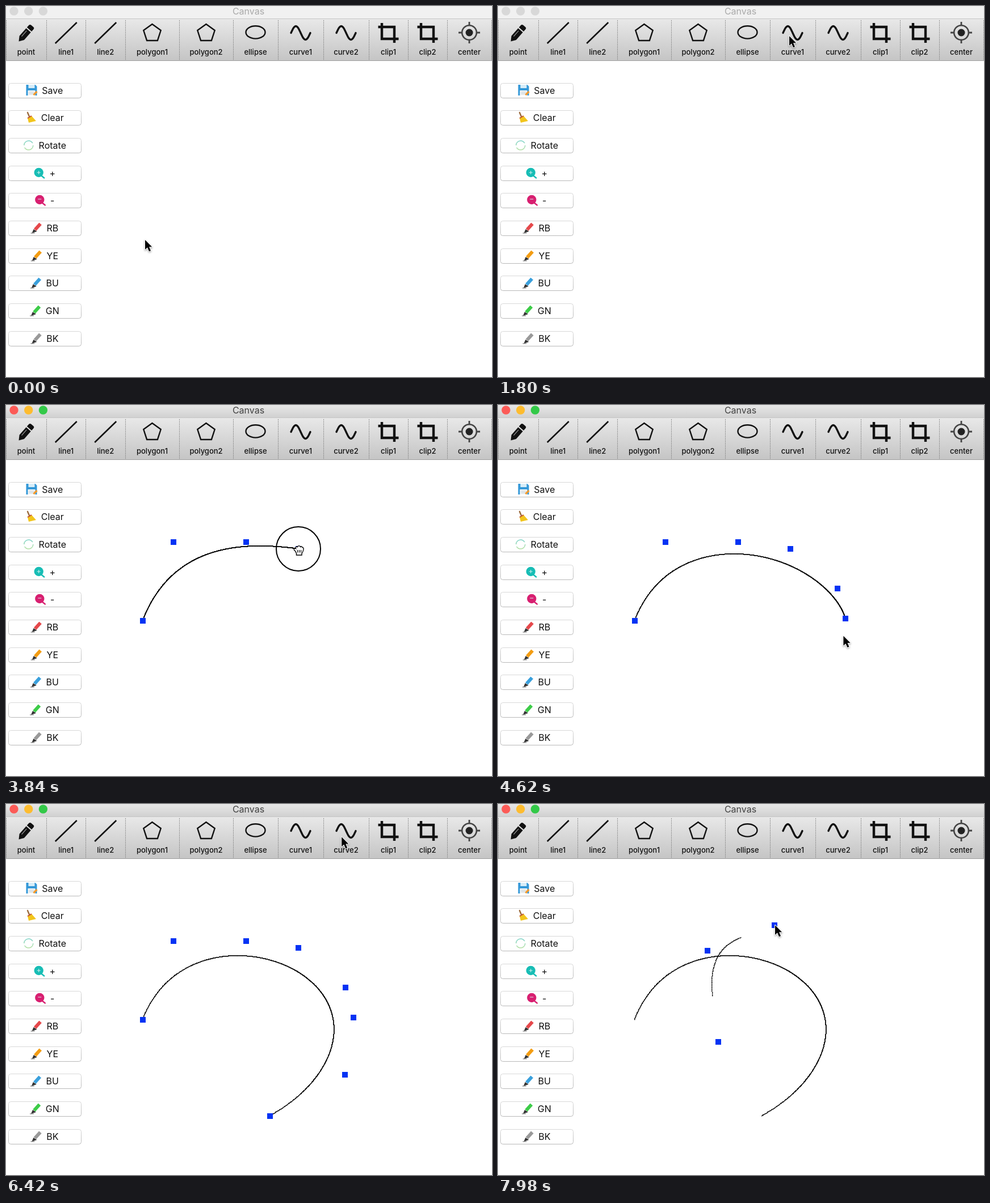
Animation of 856 by 655 pixels, one loop 8000 ms. Source, as an HTML page with a canvas:

```html
<!DOCTYPE html>
<html lang="en">
<head>
<meta charset="utf-8">
<title>Canvas</title>
<style>
html, body { margin: 0; width: 100%; height: 100%; overflow: hidden; background: #fff; }
canvas { display: block; }
</style>
</head>
<body>
<canvas id="stage" width="856" height="655"></canvas>
<script>
const ctx = document.getElementById('stage').getContext('2d');
const W = 856, H = 655, LOOP = 8000, STEP = 60, HOLD = 120;
const FONT = 'Inter, "Open Sans", sans-serif';

const stop = (x, y, press, rest = 0) => ({ x, y, press, rest, release: press + HOLD });
const hover = stop(302, 300, 480, 160);
const bezierTool = stop(512, 53, 1920);
const bezierStops = [
  stop(241, 381, 2580), stop(295, 242, 3120, 120), stop(423, 242, 3480),
  stop(515, 254, 3780), stop(598, 324, 4080), stop(612, 377, 4440),
  stop(597, 478, 4860), stop(465, 551, 5340, 180)
];
const splineTool = stop(591, 55, 6540, 180);
const splineStops = [stop(388, 420, 6960), stop(369, 259, 7380), stop(487, 214, 7860)];
const toolStops = [bezierTool, splineTool];
const canvasStops = [...bezierStops, ...splineStops];
const route = [hover, bezierTool, ...bezierStops, splineTool, ...splineStops];

function bar(x, y, w, h, color) {
  ctx.fillStyle = color;
  ctx.fillRect(x, y, w, h);
}

function fillPath(d, color) {
  ctx.fillStyle = color;
  ctx.fill(new Path2D(d));
}

function strokePath(d, color, width, cap = 'butt') {
  ctx.strokeStyle = color;
  ctx.lineWidth = width;
  ctx.lineCap = cap;
  ctx.stroke(new Path2D(d));
}

function disc(x, y, r, color) {
  ctx.fillStyle = color;
  ctx.beginPath();
  ctx.arc(x, y, r, 0, 7);
  ctx.fill();
}

function ring(x, y, rx, ry, color, width) {
  ctx.strokeStyle = color;
  ctx.lineWidth = width;
  ctx.beginPath();
  ctx.ellipse(x, y, rx, ry, 0, 0, 7);
  ctx.stroke();
}

// Joins f(0) … f(1) into path data
function trace(f, n) {
  const points = Array.from({ length: n + 1 }, (_, i) => f(i / n).join(' '));
  return 'M' + points.join('L');
}

function text(s, x, y, size, color, weight = 400) {
  ctx.font = `${weight} ${size}px ${FONT}`;
  ctx.textAlign = 'center';
  ctx.fillStyle = color;
  ctx.fillText(s, x, y);
}

function at(x, y, draw) {
  ctx.save();
  ctx.translate(x, y);
  draw();
  ctx.restore();
}

function vertical(y0, y1, top, bottom) {
  const g = ctx.createLinearGradient(0, y0, 0, y1);
  g.addColorStop(0, top);
  g.addColorStop(1, bottom);
  return g;
}

// Toolbar icons, drawn around their centre
function pencil() {
  ctx.translate(-13, 15.5);
  ctx.rotate(-0.85);
  fillPath('M0 0L8 -5.5H26V5.5H8Z', '#111');
  ctx.beginPath();
  ctx.roundRect(28, -5.5, 8, 11, [0, 3, 3, 0]);
  ctx.fill();
  strokePath('M10 -2H23', '#aaa', 1);
}

function line() {
  strokePath('M-19 19L19 -18', '#111', 2.6);
}

function polygon() {
  const corner = u => [16 * Math.sin(u * Math.PI * 2), 1 - 16 * Math.cos(u * Math.PI * 2)];
  strokePath(trace(corner, 5) + 'Z', '#111', 2.4);
}

function ellipse() {
  ring(0, -0.6, 17, 11.2, '#111', 2.4);
}

function curve() {
  const wave = u => [34 * u - 17, 0.5 - 12 * Math.sin(u * Math.PI * 2)];
  strokePath(trace(wave, 24), '#111', 3.4, 'round');
}

function crop() {
  strokePath('M-11.5 -17V11H18M-18 -10H10.5V18', '#111', 4.4);
}

function target() {
  ring(0, 0, 12.8, 12.8, '#444', 2.6);
  disc(0, 0, 6.5, '#222');
  strokePath('M-19 0H-12M12 0H19M0 -19V-12M0 12V19', '#444', 2.8);
}

// Label, icon, cell width
const tools = [
  ['point', pencil, 71], ['line1', line, 69.5], ['line2', line, 69.5],
  ['polygon1', polygon, 95], ['polygon2', polygon, 95], ['ellipse', ellipse, 79],
  ['curve1', curve, 80], ['curve2', curve, 80], ['clip1', crop, 69],
  ['clip2', crop, 69], ['center', target, 78]
];

// Side button icons
function floppy() {
  fillPath('M-10 -10H6L9 -7V9H-10Z', '#3498d8');
  bar(-6, -10, 11, 6, '#d8edf8');
  bar(-7, 0, 13, 9, '#f4f7f8');
  strokePath('M-5 3H4M-5 6H3', '#b6c3ca', 1);
  strokePath('M3 8L9 2', '#f29a2e', 3.2);
}

function broom() {
  strokePath('M-6 -9L-3 -2', '#9b6b3f', 2.4, 'round');
  fillPath('M-6 1L1 -3L9 6L-4 9Z', '#f2c51d');
  strokePath('M-6 1L1 -3', '#c0542d', 2);
}

function rotation() {
  ctx.setLineDash([21, 4]);
  ring(0, 0, 8, 8, vertical(-8, 8, '#7fd3c8', '#b4e0a4'), 1.5);
  ctx.setLineDash([]);
}

const lens = (color, sign) => () => {
  strokePath('M4 5L8.5 8.5', color, 2.4, 'round');
  disc(-1, -1, 8.2, color);
  strokePath(sign, '#d6f0ee', 1);
};

const pen = color => () => {
  strokePath('M-2.5 3L7 -7.5', color, 6);
  fillPath('M-8 9L-5 2L1 6Z', '#333');
  strokePath('M-10 9H-3', '#666', 1);
};

const buttons = [
  ['Save', floppy], ['Clear', broom], ['Rotate', rotation],
  ['+', lens('#17bdb5', 'M-4 -1H2M-1 -4V2')], ['-', lens('#d81f70', 'M-4 -2H2')],
  ['RB', pen('#e5484b')], ['YE', pen('#f39c12')], ['BU', pen('#3aa0dc')],
  ['GN', pen('#3dcc48')], ['BK', pen('#999')]
];

function drawTitle(active) {
  bar(0, 0, W, 22, active ? vertical(0, 22, '#e7e7e7', '#d1d1d1') : '#f1f1f1');
  ['#fc5b57', '#fdbc2f', '#33c948'].forEach((color, i) => {
    disc(14 + i * 25.7, 9, 7.7, active ? color : '#d8d8d8');
  });
  text('Canvas', 427, 15.3, 16, active ? '#404040' : '#a9a9a9');
}

function drawToolbar() {
  bar(0, 22, W, 75, vertical(22, 97, '#e9e9e9', '#c4c4c4'));
  bar(0, 22, W, 1, '#c6c6c6');
  bar(0, 96, W, 1, '#9f9f9f');
  let x = 0;
  for (const [label, icon, width] of tools) {
    at(x + width / 2, 47, icon);
    text(label, x + width / 2, 86, 13, '#111', 500);
    drawDivider(x);
    x += width;
  }
  drawDivider(x);
}

function drawDivider(x) {
  ctx.setLineDash([1.5, 1.5]);
  strokePath(`M${Math.floor(x) + 0.5} 25V95`, '#777', 1);
  ctx.setLineDash([]);
}

function drawButtons() {
  buttons.forEach(([label, icon], i) => {
    const top = Math.round(136.6 + i * 48.68);
    ctx.beginPath();
    ctx.roundRect(4.5, top - 0.5, 128, 26, 4);
    ctx.strokeStyle = vertical(top, top + 26, '#d8d8d8', '#b8b8b8');
    ctx.lineWidth = 1;
    ctx.stroke();
    text(label, 81.8, top + 18, 16, '#111');
    at(64 - ctx.measureText(label).width / 2, top + 12, icon);
  });
}

function bezier(points, u) {
  let p = points;
  while (p.length > 1) p = p.slice(1).map((q, i) => mix(p[i], q, u));
  return p[0];
}

function mix(a, b, u) {
  return { x: a.x + (b.x - a.x) * u, y: a.y + (b.y - a.y) * u };
}

function plot(points, samples) {
  for (let i = 0; i <= samples; i++) {
    const { x, y } = bezier(points, i / samples);
    bar(Math.floor(x - 0.8), Math.floor(y - 0.8), 1.4, 1.4, '#000');
  }
}

function drawCurves(t) {
  const placed = stops => stops.filter(s => t >= s.press);
  const a = placed(bezierStops), b = placed(splineStops);
  if (a.length > 1) plot(a, 1000);
  // A quadratic B-spline segment runs between the leg midpoints
  if (b.length > 2) plot([mix(b[0], b[1], 0.5), b[1], mix(b[1], b[2], 0.5)], 100);
  for (const { x, y } of t < splineTool.press ? a : b) bar(x - 5, y - 5, 10, 10, '#0433f4');
}

// Leaves each stop after its release; far stops take longer to reach
function pointer(t) {
  let p = { x: 244, y: 413 }, free = 0;
  for (const s of route) {
    const leave = free + s.rest;
    if (t <= leave) break;
    const travel = Math.min(1.6 * Math.hypot(s.x - p.x, s.y - p.y), s.press - leave);
    const u = Math.min(1, (t - leave) / travel);
    p = mix(p, s, u * u * (3 - 2 * u));
    free = s.release;
  }
  return p;
}

const arrow = new Path2D('M0 0V17L4 13.3L7 20.2L10 18.9L7.1 12.2H12.2Z');
const hand = 'M-6 2L-8 0C-9 -2 -7 -4 -5 -2.5C-6 -6 -3 -7 -2 -5.5C-1 -8 2 -8 3 -5.5'
  + 'C4 -7 6 -6.5 6.2 -4.5C8 -5 9 -3 8.5 -1C8 2 7 4 5.5 6V9H-4V6Z';

function drawArrow() {
  ctx.save();
  ctx.shadowColor = 'rgba(0,0,0,.35)';
  ctx.shadowBlur = 3;
  ctx.shadowOffsetY = 1.5;
  ctx.lineWidth = 2;
  ctx.lineJoin = 'round';
  ctx.strokeStyle = '#fff';
  ctx.stroke(arrow);
  ctx.restore();
  ctx.fillStyle = '#000';
  ctx.fill(arrow);
}

function drawHand() {
  fillPath(hand, '#fff');
  strokePath(hand, '#000', 1.4);
  strokePath('M-2 0V4.5M1 0V4.5M4 0V4.5', '#000', 1.2);
}

function drawPointer(t) {
  const held = s => t >= s.press && t < s.release;
  const grab = canvasStops.find(held), press = grab || toolStops.find(held);
  if (press) ring(press.x, press.y, 39, 39, '#000', 2);
  const { x, y } = pointer(t);
  if (grab) at(x + 0.5, y + 2, drawHand);
  else at(x + 1, y, drawArrow);
}

function render(now) {
  const t = Math.floor((now % LOOP) / STEP) * STEP;
  bar(0, 0, W, H, '#fff');
  drawTitle(t >= bezierTool.press);
  drawToolbar();
  drawButtons();
  drawCurves(t);
  drawPointer(t);
}

const began = performance.now();
function tick() {
  render(performance.now() - began);
  requestAnimationFrame(tick);
}
tick();
</script>
</body>
</html>
```
